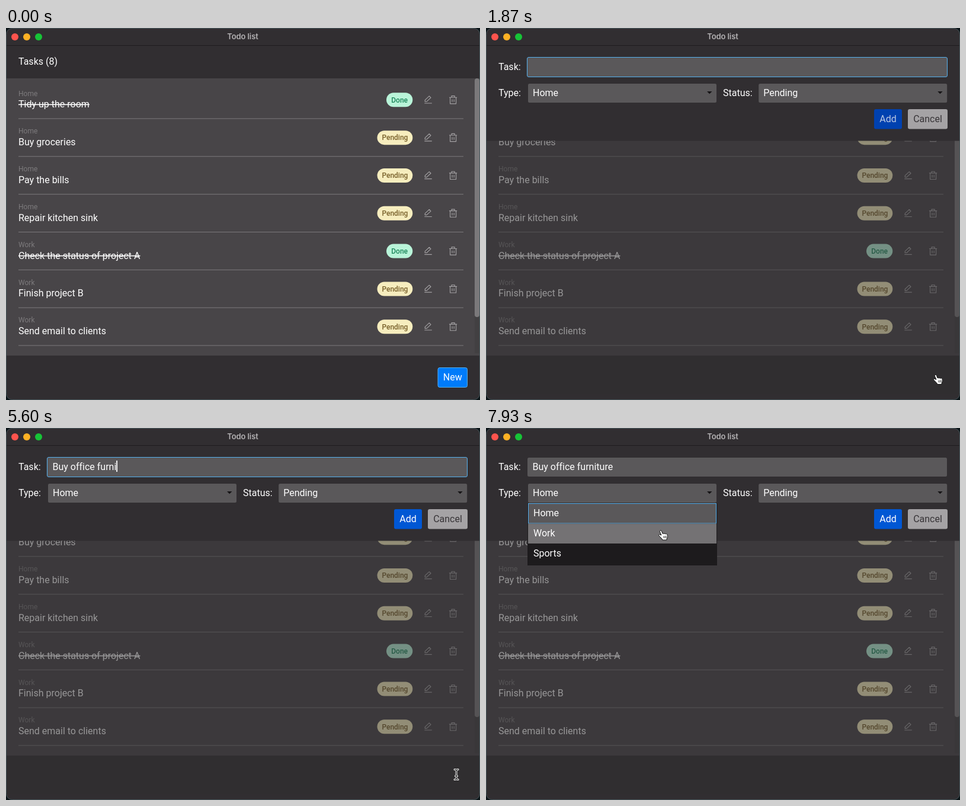
An HTML page for the animation above (8000 ms loop, 800x628 px).

```html
<!DOCTYPE html>
<html lang="en">
<head>
<meta charset="utf-8">
<title>Todo list</title>
<style>
  html, body { margin: 0; width: 100%; height: 100%; overflow: hidden; background: #0b1417; }
  svg { display: block; width: 800px; height: 628px; }
  text { font-family: Roboto, sans-serif; font-size: 16px; fill: #fff; white-space: pre; font-variant-ligatures: none; }
  .title { font: 600 13px Inter, sans-serif; fill: #b4b2b4; text-anchor: middle; letter-spacing: -.1px; }
  .kind { font-size: 12px; fill: #7d7b7d; }
  .pill { font-size: 12px; font-weight: 500; text-anchor: middle; }
  .mid { text-anchor: middle; }
  .done { text-decoration: line-through; }
</style>
</head>
<body>
<svg id="stage" viewBox="0 0 800 628" xmlns="http://www.w3.org/2000/svg">
  <defs>
    <clipPath id="listClip"><rect x="1" y="85" width="798" height="468"/></clipPath>
    <clipPath id="bodyClip"><rect x="1" y="30" width="798" height="597"/></clipPath>
    <g id="icons" fill="none" stroke="#a3a1a3" stroke-width="1.15" stroke-linejoin="round">
      <path d="M706.3 127H718.8M707.2 124.2V121.6L714.3 114.9 717 117.6 710 124.2Z"/>
      <path d="M748 117.2H761.2M752 117V114.6H757.2V117M749.6 117.4V127.8H759.6V117.4M753 120.4V124.8M756.2 120.4V124.8"/>
    </g>
  </defs>
  <rect x=".5" y=".5" width="799" height="627" rx="10" fill="#312e31" stroke="#46565b"/>
  <path d="M1 29.5H799" stroke="#1e1c1e"/>
  <circle cx="15" cy="15" r="6" fill="#fe544d"/>
  <circle cx="35" cy="15" r="6" fill="#fdb124"/>
  <circle cx="55" cy="15" r="6" fill="#17c437"/>
  <text class="title" x="399.5" y="18.7">Todo list</text>

  <text x="21" y="61.5">Tasks (8)</text>
  <rect x="1" y="85" width="798" height="468" fill="#484548"/>
  <rect x="791" y="85" width="8" height="464" fill="#424042"/>
  <rect x="791" y="85" width="8" height="403" rx="4" fill="#7b797b"/>
  <g id="list" clip-path="url(#listClip)"></g>

  <g id="newButton">
    <rect x="729" y="573.5" width="49.5" height="33" rx="3" fill="#007bfa" stroke="#55b0f5"/>
    <text class="mid" x="753.7" y="595">New</text>
  </g>
  <rect id="shade" x="1" y="30" width="798" height="588" fill="#312e31" opacity=".5"/>

  <g clip-path="url(#bodyClip)">
    <g id="panel">
      <rect x="1" y="20" width="798" height="170.5" fill="#312e31"/>
      <text x="21" y="70.5">Task:</text>
      <rect id="field" x="70" y="50" width="708" height="32" rx="2.5" fill="#5a585a"/>
      <text id="entry" x="78.5" y="70.5"></text>
      <rect id="caret" y="55" width="1.8" height="19" fill="#fff"/>
      <text x="21" y="114.5">Type:</text>
      <text x="400" y="114.5">Status:</text>
      <g id="selects"></g>
      <g id="add">
        <rect id="addBox" x="655" y="137" width="47" height="33.5" rx="3"/>
        <text id="addText" class="mid" x="678.5" y="158.5">Add</text>
      </g>
      <rect x="712" y="137" width="67" height="33.5" rx="3" fill="#a5a3a5"/>
      <text class="mid" x="745.5" y="158.5" style="fill:#373437">Cancel</text>
    </g>
  </g>

  <g id="menu">
    <rect x="70" y="127" width="320" height="105" fill="#1d1b1d"/>
    <rect x="71.5" y="127.5" width="317" height="33.5" fill="#5a585a" stroke="#55b0ee"/>
    <rect id="hover" x="71" y="161.5" width="318" height="33.5" fill="#747274"/>
    <text x="80" y="149.3">Home</text>
    <text x="80" y="183.3">Work</text>
    <text x="80" y="217.3">Sports</text>
  </g>

  <!-- cursor shapes have their hot spot at 0,0 -->
  <g id="hand" fill="#fff" stroke="#111" stroke-width="1" stroke-linejoin="round">
    <path d="M-1.5 0C-2.8-.1-3.5 1-3 2.2L-.6 8-3.2 6.9C-4.6 6.5-5.6 7.7-4.6 8.8L.6 14.2 1.2 16H8.4L8.6 14C9.9 12 10.2 9.5 9.4 6.8 9 5.4 7.3 5.2 6.7 6.3 6.3 5 4.5 4.7 3.9 5.9 3.4 4.8 2 4.7 1.5 5.4L-.1 1C-.4.3-.8 0-1.5 0Z"/>
    <path d="M3 9.4L3.8 13M5.2 9L5.8 13M7.3 8.8L7.7 12.8" fill="none" stroke-width=".8"/>
  </g>
  <g id="beam" fill="none" stroke-linecap="round">
    <path d="M-3-8.5Q0-8.5 0-6Q0-8.5 3-8.5M0-6V6M-3 8.5Q0 8.5 0 6Q0 8.5 3 8.5M-1.5 2.5H1.5" stroke="#fff" stroke-width="3"/>
    <path d="M-3-8.5Q0-8.5 0-6Q0-8.5 3-8.5M0-6V6M-3 8.5Q0 8.5 0 6Q0 8.5 3 8.5M-1.5 2.5H1.5" stroke="#111" stroke-width="1.1"/>
  </g>
  <path id="arrow" d="M0 0V14.6L3.4 11.5 5.6 16.8 8.2 15.7 6 10.6H10.6Z" fill="#111" stroke="#fff" stroke-width="1.1"/>
</svg>
<script>
const LOOP = 8000;
const $ = id => document.getElementById(id);

const tasks = [
  ['Home', 'Tidy up the room', true],
  ['Home', 'Buy groceries'],
  ['Home', 'Pay the bills'],
  ['Home', 'Repair kitchen sink'],
  ['Work', 'Check the status of project A', true],
  ['Work', 'Finish project B'],
  ['Work', 'Send email to clients']
];

function taskRow([kind, name, done], i) {
  const [x, label, fill, ink] = done
    ? [642, 'Done', '#b9f4d9', '#1d875c']
    : [626.5, 'Pending', '#f6edbe', '#78602a'];
  return `<g transform="translate(0 ${(i * 63.83).toFixed(2)})">
    <text class="kind" x="21" y="114.5">${kind}</text>
    <text class="${done ? 'done' : ''}" x="21" y="134.3">${name}</text>
    <rect x="${x}" y="109.3" width="${686.3 - x}" height="24" rx="12" fill="${fill}"/>
    <text class="pill" x="${(x + 686.3) / 2}" y="125.6" style="fill:${ink}">${label}</text>
    <use href="#icons"/>
    <path d="M21 153H772" stroke="#7c7a7c"/>
  </g>`;
}

const selectBox = (x, label) => `
  <rect x="${x}" y="94" width="318" height="32" rx="2.5" fill="#5a585a"/>
  <text x="${x + 8}" y="114.5">${label}</text>
  <path d="M${x + 302} 107H${x + 310.5}L${x + 306.2} 111.3Z" fill="#151315"/>`;

$('list').innerHTML = tasks.map(taskRow).join('');
$('selects').innerHTML = selectBox(71, 'Home') + selectBox(460.2, 'Pending');

// Moment at which each character of the entry is typed
const phrase = 'Buy office furniture';
const keyTimes = [2330, 2530, 2700, 3070, 3330, 3670, 4070, 4200, 4330, 4470,
  4800, 5070, 5130, 5200, 5400, 5530, 5730, 5870, 5930, 6070];

// Pointer stops: time, x, y
const stops = [[270, 806, 552], [850, 760.5, 585.5], [2530, 760.5, 585.5],
  [6470, 760, 585], [7070, 326.5, 115.5], [7190, 320, 112], [7390, 320, 112], [7870, 296.5, 173]];

const OPEN = 1070, SLIDE = 1130, MENU = 7330;
const clamp = v => Math.max(0, Math.min(1, v));
const smooth = p => p * p * (3 - 2 * p);
const show = (id, on) => $(id).setAttribute('display', on ? 'inline' : 'none');

function pointerAt(t) {
  let i = 0;
  while (i < stops.length - 2 && t >= stops[i + 1][0]) i++;
  const [t0, x0, y0] = stops[i], [t1, x1, y1] = stops[i + 1];
  const p = smooth(clamp((t - t0) / (t1 - t0)));
  return [x0 + (x1 - x0) * p, y0 + (y1 - y0) * p];
}

function drawPointer(t) {
  const [x, y] = pointerAt(t);
  const overButton = t < 2530 && x < 779 && y > 573;
  const overMenu = t >= MENU && y > 127;
  const shape = t < 270 ? '' : overButton || overMenu ? 'hand'
    : t >= 2530 && t < 6470 ? 'beam' : 'arrow';
  for (const id of ['hand', 'beam', 'arrow']) show(id, id === shape);
  if (shape) $(shape).setAttribute('transform', `translate(${x.toFixed(2)} ${y.toFixed(2)})`);
  show('hover', overMenu && y > 161);
}

function drawField(t) {
  const count = keyTimes.filter(k => k <= t).length;
  const entry = $('entry'), field = $('field');
  entry.textContent = phrase.slice(0, count);
  const focused = t < MENU;
  const grow = focused ? .5 : 0;
  field.setAttribute('x', 70 - grow);
  field.setAttribute('y', 50 - grow);
  field.setAttribute('width', 708 + 2 * grow);
  field.setAttribute('height', 32 + 2 * grow);
  field.setAttribute('stroke', focused ? '#55b0ee' : 'none');
  const width = count ? entry.getComputedTextLength() : 0;
  $('caret').setAttribute('x', 78.4 + width);
  show('caret', focused && Math.floor((t - 1170) / 500) % 2 === 0);
  $('addBox').setAttribute('fill', count ? '#0057d4' : '#0041b0');
  $('addText').style.fill = count ? '#fff' : '#b9c8e2';
}

function draw(t) {
  const opened = t >= OPEN;
  show('newButton', !opened);
  show('shade', opened);
  show('panel', t > SLIDE);
  const left = Math.pow(1 - clamp((t - SLIDE) / 280), 3);
  $('panel').setAttribute('transform', `translate(0 ${(-162 * left).toFixed(2)})`);
  drawField(t);
  show('menu', t >= MENU);
  drawPointer(t);
}

const start = performance.now();
function tick() {
  draw((performance.now() - start) % LOOP);
  requestAnimationFrame(tick);
}
tick();
</script>
</body>
</html>
```
